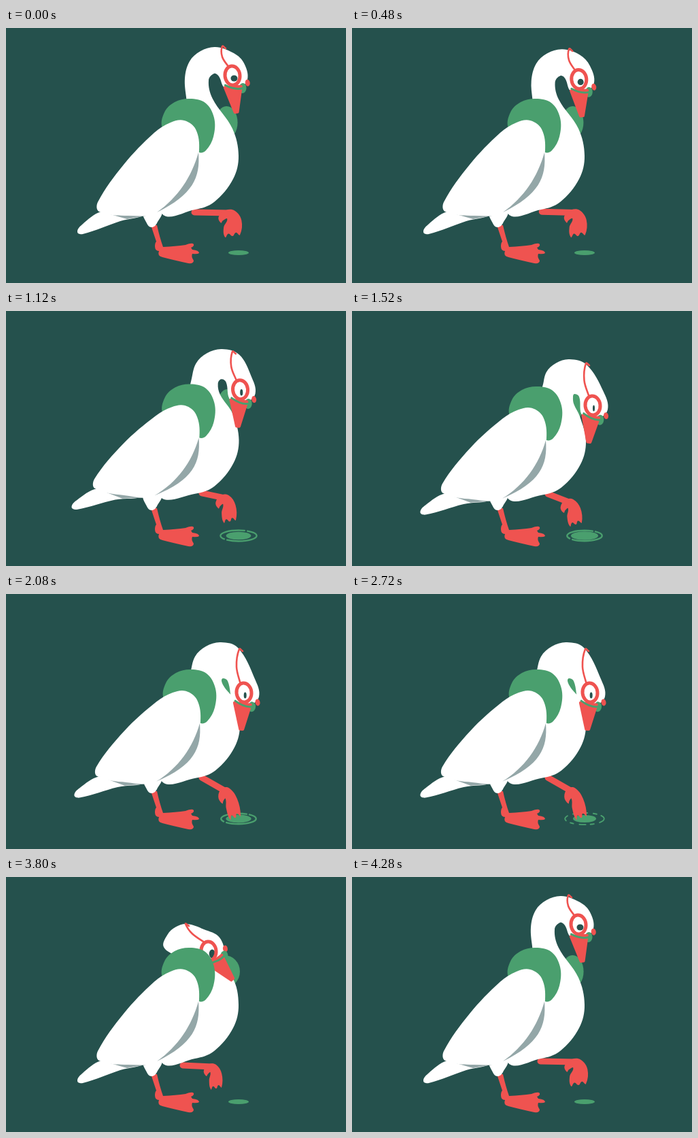
Animation of 500 by 375 pixels, one loop 4.32 s. Source, as an HTML page with a canvas:

```html
<!DOCTYPE html>
<html lang="en">
<head>
<meta charset="utf-8">
<title>Goose and puddle</title>
<style>
html, body { margin: 0; width: 100%; height: 100%; overflow: hidden; background: #25514d; }
canvas { display: block; width: 100vw; height: 100vh; }
</style>
</head>
<body>
<canvas id="stage" width="500" height="375"></canvas>
<script>
const ctx = document.getElementById('stage').getContext('2d');
const LOOP = 4320, STEP = 40;
const BG = '#25514d', GREEN = '#4a9f6e', RED = '#ef5350', GRAY = '#94a7a8', WHITE = '#fff';

// crown, eye, strap and throat are joints; tilt turns the beak (degrees),
// size scales the back of the skull, gap opens the throat.
const heads = {
  tall:   { crown: [308, 28], eye: [333, 70],  strap: [318, 27], throat: [306, 67],  pupil: [5, 4.5],   tilt: 6,  size: 1,    gap: 8 },
  bent:   { crown: [316, 44], eye: [337, 97],  strap: [324, 46], throat: [308, 83],  pupil: [2.5, 5],   tilt: -2, size: 1.1,  gap: 7 },
  low:    { crown: [320, 71], eye: [354, 139], strap: [344, 77], throat: [327, 122], pupil: [1.5, 4.5], tilt: -6, size: 0.9,  gap: 2 },
  peer:   { crown: [316, 71], eye: [350, 145], strap: [343, 81], throat: [319, 124], pupil: [2, 4.5],   tilt: -4, size: 1,    gap: 2 },
  recoil: { crown: [302, 52], eye: [330, 98],  strap: [312, 49], throat: [302, 100], pupil: [4.5, 5],   tilt: 22, size: 1,    gap: 3 },
  tucked: { crown: [266, 69], eye: [298, 109], strap: [264, 69], throat: [298, 126], pupil: [4.5, 6.5], tilt: 40, size: 0.75, gap: 0 }
};
heads.stretch = mix(heads.bent, heads.tall, 1.2);
heads.startle = mix(heads.recoil, heads.tall, 0.4);
heads.spring = mix(heads.tucked, heads.tall, 1.07);

// Rump swing in degrees and shift of the breast.
const bodies = {
  rest: { swing: 0,   shift: [0, 0] },
  high: { swing: 6,   shift: [-1, 0] },
  lean: { swing: 3.4, shift: [2, 7] }
};

const feet = {
  drip:  { hip: [277, 271], heel: [328, 272], toe: [333, 305], spread: 11 },
  curl:  { hip: [288, 267], heel: [323, 270], toe: [329, 305], spread: 9 },
  reach: { hip: [288, 269], heel: [319, 281], toe: [329, 313], spread: 9 },
  dip:   { hip: [288, 270], heel: [323, 290], toe: [337, 328], spread: 8 },
  lift:  { hip: [274, 273], heel: [312, 279], toe: [334, 294], spread: 8 },
  back:  { hip: [260, 277], heel: [303, 279], toe: [309, 310], spread: 8 }
};

const pools = { dry: { r: [15, 3.5] }, wet: { r: [17, 5.5] }, full: { r: [20, 6.3] } };

const headTrack = [[0, 'tall'], [200, 'stretch'], [400, 'tall'], [800, 'bent'], [1520, 'low'], [1680, 'peer'],
  [2800, 'peer'], [3040, 'startle'], [3160, 'recoil'], [3400, 'tucked'], [3920, 'tucked'], [4160, 'spring'], [4280, 'tall']];
const bodyTrack = [[0, 'rest'], [560, 'rest'], [760, 'high'], [960, 'high'], [1280, 'lean'],
  [2800, 'lean'], [3040, 'high'], [3200, 'high'], [3360, 'rest']];
const footTrack = [[0, 'drip'], [400, 'drip'], [800, 'curl'], [1520, 'reach'], [1760, 'reach'], [2000, 'dip'],
  [2760, 'dip'], [3000, 'lift'], [3160, 'lift'], [3480, 'back'], [3920, 'back'], [4240, 'drip']];
const poolTrack = [[0, 'dry'], [560, 'dry'], [800, 'wet'], [1520, 'full'], [2720, 'wet'], [3000, 'full'], [3160, 'full'], [3560, 'dry']];
const rippleStarts = [520, 960, 1400, 1960, 2440, 2720];

function lerp(a, b, k) {
  return Array.isArray(a) ? a.map((v, i) => lerp(v, b[i], k)) : a + (b - a) * k;
}
function mix(a, b, k) {
  const out = {};
  for (const key in a) out[key] = lerp(a[key], b[key], k);
  return out;
}
function pose(track, set, t) {
  let i = track.length - 1;
  while (track[i][0] > t) i--;
  const [t0, from] = track[i], next = track[i + 1];
  return next ? mix(set[from], set[next[1]], (t - t0) / (next[0] - t0)) : set[from];
}
function add([x, y], dx, dy) { return [x + dx, y + dy]; }
function turn([x, y], degrees) {
  const a = degrees * Math.PI / 180, c = Math.cos(a), s = Math.sin(a);
  return [x * c + y * s, y * c - x * s];
}

// Smooth curve through points; handles scale with each segment so corners stay tight.
function curve(p, closed) {
  const n = p.length;
  const at = i => p[closed ? (i + n) % n : Math.max(0, Math.min(n - 1, i))];
  const tangent = i => {
    const a = at(i - 1), b = at(i + 1), d = Math.hypot(b[0] - a[0], b[1] - a[1]) || 1;
    return [(b[0] - a[0]) / d, (b[1] - a[1]) / d];
  };
  ctx.beginPath();
  ctx.moveTo(...p[0]);
  for (let i = 0; i < (closed ? n : n - 1); i++) {
    const a = at(i), b = at(i + 1), u = tangent(i), v = tangent(i + 1);
    const h = Math.hypot(b[0] - a[0], b[1] - a[1]) * 0.35;
    ctx.bezierCurveTo(a[0] + u[0] * h, a[1] + u[1] * h, b[0] - v[0] * h, b[1] - v[1] * h, ...b);
  }
  if (closed) ctx.closePath();
}
function fill(color) { ctx.fillStyle = color; ctx.fill(); }
function stroke(color, width) { ctx.strokeStyle = color; ctx.lineWidth = width; ctx.stroke(); }
function blob(points, color) { curve(points, true); fill(color); }
function oval([x, y], rx, ry, tilt = 0) { ctx.beginPath(); ctx.ellipse(x, y, rx, ry, tilt, 0, Math.PI * 2); }
function poly(points) {
  ctx.beginPath();
  points.forEach(p => ctx.lineTo(...p));
  ctx.closePath();
}

// Parts of the resting body; the rump bends round the shoulder.
const belly = [[342, 188], [334, 222], [306, 256], [278, 267], [228, 271], [230, 180]];
const tail = [[200, 262], [140, 270], [112, 289], [105, 300], [113, 303], [168, 284], [210, 272]];
const wing = [[262, 136], [279, 149], [284, 180], [275, 220], [222, 271], [180, 276], [137, 270], [135, 256], [173, 201], [218, 154], [242, 139]];
const fold = [[150, 273], [178, 281], [206, 276], [200, 268]];
const shade = [[283, 183], [286, 220], [275, 245], [222, 271], [253, 249], [273, 219]];
const scarf = [[230, 147], [233, 124], [248, 109], [270, 104], [293, 110], [306, 132], [305, 160], [294, 180], [284, 183], [250, 165]];
const thigh = [[203, 268], [208, 289], [215, 293], [222, 287], [228, 268]];
const standing = new Path2D('M213,290L222,290Q226,308 231,322Q250,321 264,319Q274,315 276,318Q277,321 272,323' +
  'L274,326Q284,327 284,331Q282,333 274,332Q272,336 276,342Q276,347 268,346Q245,341 230,337Q222,335 225,328' +
  'Q219,328 219,321Q219,316 221,314Z');

function bend(points, body) {
  const pivot = [285, 183];
  return points.map(([x, y]) => {
    const weight = Math.max(0, Math.min(1, (pivot[0] - x) / 110));
    const [dx, dy] = turn([x - pivot[0], y - pivot[1]], -body.swing * weight);
    return [pivot[0] + dx + body.shift[0], pivot[1] + dy + body.shift[1]];
  });
}

function drawPuddle(t) {
  const center = [342, 330.5];
  oval(center, ...pose(poolTrack, pools, t).r);
  fill(GREEN);
  for (const start of rippleStarts) {
    const p = (t - start) / 440;
    if (p <= 0 || p >= 1) continue;
    const r = 20 + 11 * Math.sqrt(p);
    oval(center, r, r * 0.3);
    ctx.setLineDash(p < 0.4 ? [46, 4] : [20 * (1.1 - p), 6 + 4 * p, 5, 7]);
    stroke(GREEN, 2.8 - 1.4 * p);
    ctx.setLineDash([]);
  }
}

function drawFoot({ hip, heel, toe, spread }) {
  const dx = toe[0] - heel[0], dy = toe[1] - heel[1], len = Math.hypot(dx, dy);
  const at = (along, across) => add(heel, dx * along + dy / len * across, dy * along - dx / len * across);
  ctx.beginPath();
  ctx.moveTo(...hip);
  ctx.lineTo(...heel);
  stroke(RED, 9);
  const outline = [at(-0.14, -4), at(-0.06, 0.8 * spread), at(0.4, 1.5 * spread)];
  for (let i = 0; i < 5; i++) outline.push(at(i % 2 ? 0.9 : 1.03, spread * (1 - i / 2)));
  outline.push(at(0.6, -spread), at(0.25, -4), at(0.3, -spread), at(0.38, -spread - 3), at(0.1, -spread - 5));
  blob(outline, RED);
}

function outlineHead(h, body) {
  const { crown, eye, throat, size, gap } = h;
  const back = (x, y) => add(crown, x * size, y * size);
  const chest = add([333, 148], ...body.shift);
  const beakBase = add(eye, ...turn([-13, 17], h.tilt));
  return [
    add([264, 130], ...body.shift), back(-45, 46), back(-38, 21), back(-22, 6), crown, add(crown, 25, 8),
    add(eye, 16, -20), add(eye, 22, 6), add(eye, 7, 19), beakBase,
    add(throat, 7, 4), throat, add(throat, -gap, gap + 2),
    add(lerp(throat, chest, 0.45), -1.7 * gap - 1, 0), chest
  ];
}

function drawFace({ eye, strap, pupil, tilt }) {
  const on = (x, y) => add(eye, ...turn([x, y], tilt));
  const lens = [11, 14];
  const cheek = on(13, 20);
  oval(on(21, 13), 3.5, 5, -0.15);
  fill(RED);
  oval(cheek, 5.5, 7.5, 0.1);
  fill(GREEN);
  poly([on(-13, 16), on(11, 17), on(2, 54), on(-2, 54)]);
  fill(RED);
  stroke(RED, 4);
  ctx.beginPath();
  ctx.moveTo(...on(-12, 13));
  ctx.quadraticCurveTo(...on(2, 22), ...cheek);
  stroke(GREEN, 3);
  oval(eye, ...lens);
  fill(WHITE);
  oval(add(eye, 2 + tilt * 0.08, 4), ...pupil);
  fill(BG);
  oval(eye, ...lens, -0.1);
  stroke(RED, 5);
  const end = add(eye, -5, -12);
  curve([add(strap, 5, 3), strap, add(lerp(strap, end, 0.5), -5, 0), end], false);
  stroke(RED, 2.6);
}

function draw(t) {
  const head = pose(headTrack, heads, t), body = pose(bodyTrack, bodies, t);
  ctx.fillStyle = BG;
  ctx.fillRect(0, 0, 500, 375);
  ctx.lineCap = ctx.lineJoin = 'round';

  drawPuddle(t);
  ctx.fillStyle = RED;
  ctx.fill(standing);
  oval([325 - head.tilt * 0.1, 139], 15 + head.tilt * 0.2, 24);
  fill(GREEN);
  drawFoot(pose(footTrack, feet, t));
  blob(bend(tail, body), WHITE);
  blob(thigh, WHITE);
  blob([...outlineHead(head, body), ...bend(belly, { swing: body.swing, shift: [body.shift[0], body.shift[1] / 2] })], WHITE);
  drawFace(head);
  blob(scarf.map(p => add(p, ...body.shift)), GREEN);
  poly(bend(fold, body));
  fill(GRAY);
  blob(bend(wing, body), WHITE);

  const [tip, a, b, low, c, d] = bend(shade, body);
  ctx.beginPath();
  ctx.moveTo(...tip);
  ctx.bezierCurveTo(...a, ...b, ...low);
  ctx.bezierCurveTo(...c, ...d, ...tip);
  fill(GRAY);
}

const begin = performance.now();
function tick() {
  const t = Math.max(0, performance.now() - begin) % LOOP;
  draw(Math.floor(t / STEP) * STEP);
  requestAnimationFrame(tick);
}
tick();
</script>
</body>
</html>
```
